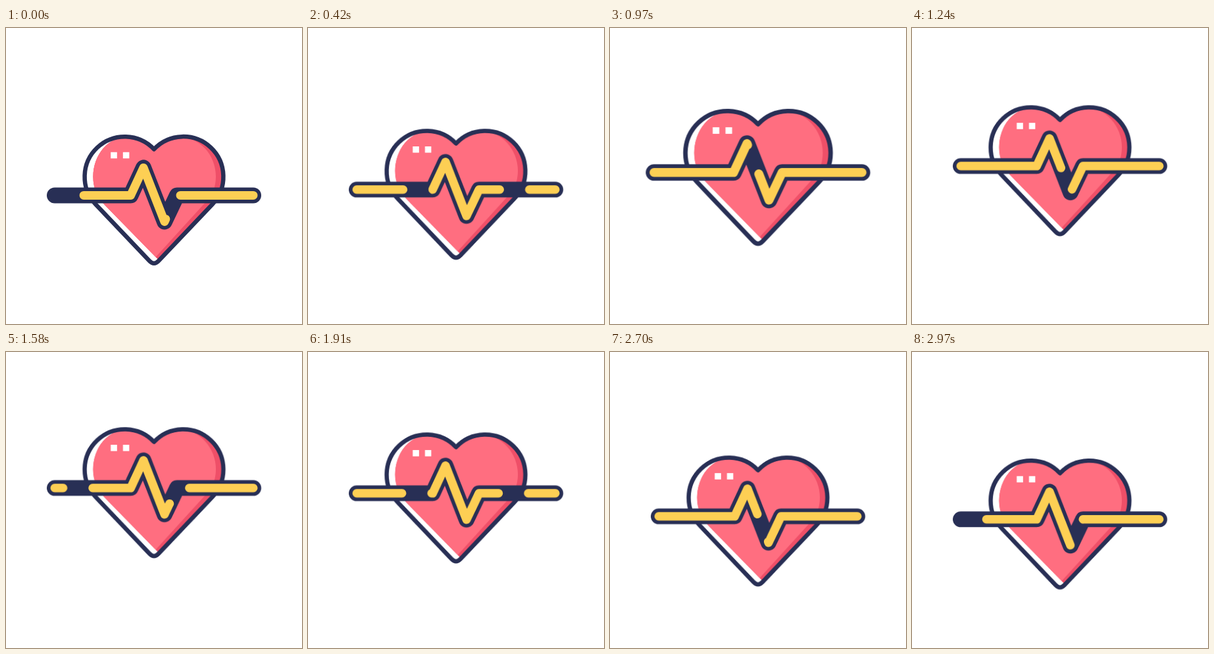
Recreate the animation shown at these times as an HTML page without scripts. Size 450 by 450 pixels, loop 3 s.

```html
<!DOCTYPE html>
<html lang="en">
<head>
<meta charset="utf-8">
<title>Heartbeat</title>
<style>
  html, body { margin: 0; width: 100%; height: 100%; overflow: hidden; background: #fff; }
  svg { display: block; width: 100%; height: 100%; }

  .bob { animation: bob 1.5s cubic-bezier(.364, 0, .636, 1) infinite alternate; }
  .beat { transform-origin: 225px 256px; animation: beat 1.5s cubic-bezier(.364, 0, .636, 1) infinite; }

  .ink, .pulse { fill: none; stroke-linecap: round; stroke-linejoin: round; }
  .ink { stroke: #282f55; }
  .pulse {
    stroke: #fdcf54;
    stroke-width: 13;
    stroke-dasharray: 210 45;
    animation: run 1.5s linear infinite;
  }

  @keyframes bob { to { transform: translateY(-48px); } }
  @keyframes beat {
    0%, 50%, 80%, 100% { transform: scale(1); }
    65% { transform: scale(1.047); }
  }
  @keyframes run {
    from { stroke-dashoffset: 211px; }
    to { stroke-dashoffset: -44px; }
  }
</style>
</head>
<body>
<svg viewBox="0 0 450 450">
  <defs>
    <path id="heart" d="M225 184.3 A61 61 0 1 0 136.2 268 L218 354.1 Q225 361.5 232 354.1 L313.8 268 A61 61 0 1 0 225 184.3 Z"/>
    <path id="trace" d="M74 254.4 H189.5 L209 212.4 L241 294.4 L260 254.4 H376"/>
    <clipPath id="inside"><use href="#heart"/></clipPath>
  </defs>
  <g class="bob">
    <g class="beat">
      <use href="#heart" fill="#fff"/>
      <g clip-path="url(#inside)">
        <!-- shaded side, then the lit face over it -->
        <path fill="#ef4f68" d="M185 165 A53 61 0 0 0 132.4 226 Q132.4 251 150 269 L240 361 L340 300 V150 H185 Z"/>
        <path fill="#ff6e80" d="M185 165 A53 61 0 0 0 132.4 226 Q132.4 251 150 269 L227.5 348.2 L301 267.5 Q319 251 319 226 A57 61 0 0 0 262 165 V150 H185 Z"/>
      </g>
      <path fill="#fff" d="M159.2 188.7 h9.6 v9.6 h-9.6 z m18.6 0 h9.6 v9.6 h-9.6 z"/>
      <use href="#heart" class="ink" stroke-width="6.5"/>
      <use href="#trace" class="ink" stroke-width="24"/>
      <use href="#trace" class="pulse"/>
    </g>
  </g>
</svg>
</body>
</html>
```
